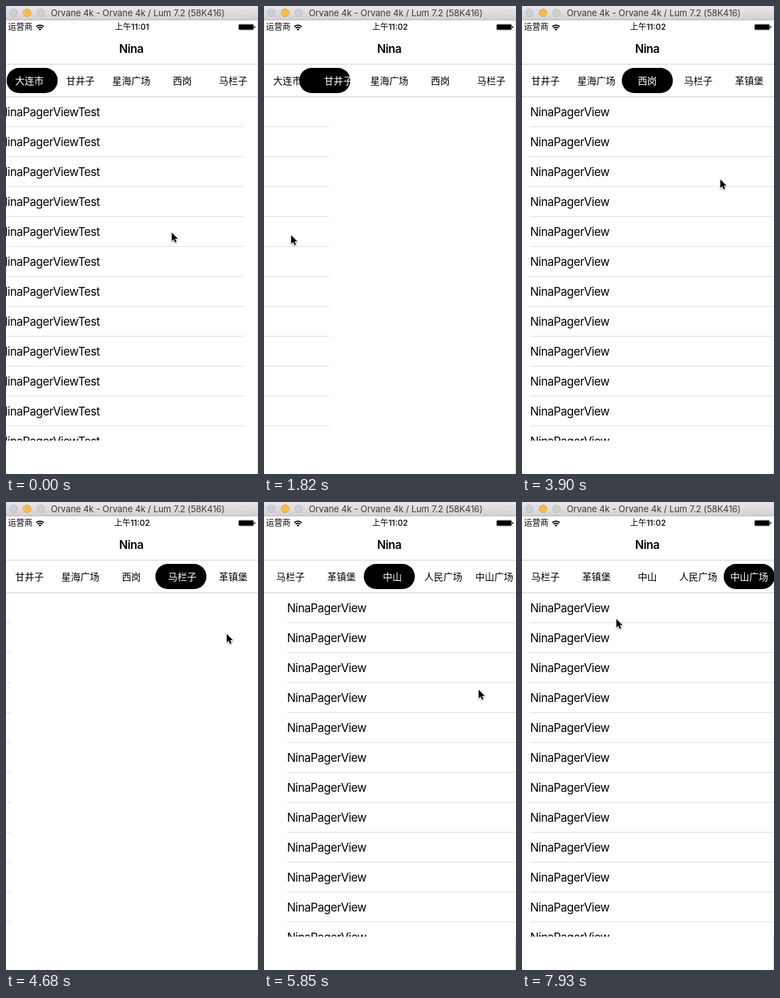
Write an HTML page that moves like this. It is 371 by 688 pixels and loops after 8 s.

```html
<!DOCTYPE html>
<html lang="zh">
<head>
<meta charset="utf-8">
<title>Pager</title>
<style>
html, body { margin: 0; width: 100%; height: 100%; overflow: hidden; background: #fff; }
body { font: 17px Inter, "Noto Sans CJK SC", "Noto Sans CJK", sans-serif; color: #000; }
#stage { position: absolute; left: 0; top: 0; width: 371px; height: 688px; overflow: hidden; background: #fff; }
#stage div, svg { position: absolute; white-space: nowrap; }
#bar { left: 0; top: 0; width: 371px; height: 20px; background: linear-gradient(#e9e7e9, #d3d1d3); border-bottom: 1px solid #b9b7b9; }
#bar i { position: absolute; top: 4px; width: 10px; height: 10px; border: 1px solid #bdbbbd; border-radius: 50%; background: #d0ced0; }
#bar i.on { background: #fdbd41; border-color: #e0a033; }
#bar div { left: 66px; line-height: 20px; font-size: 13px; letter-spacing: -.1px; color: #3c3c3c; }
#carrier { left: 3px; top: 21px; font-size: 12px; line-height: 20px; }
#clock { left: 0; width: 371px; top: 21px; text-align: center; font-size: 12px; line-height: 20px; font-weight: 500; }
#nav { left: 0; width: 369px; top: 50px; text-align: center; line-height: 26px; font-weight: 600; letter-spacing: -.4px; }
#tabBox { left: 0; top: 85px; width: 371px; height: 47px; border: solid #d2d2d4; border-width: 1px 0; overflow: hidden; }
#tabs { top: 0; left: 0; }
#pill { top: 5.4px; width: 75px; height: 36.2px; border-radius: 18.1px; background: #000; }
.tab { top: 0; width: 75px; text-align: center; font-size: 14px; line-height: 47px; }
#edge { left: 370px; width: 1px; background: #dcdcdc; bottom: 0; }
#view { left: 0; top: 134px; width: 371px; height: 505px; overflow: hidden; }
#pages { top: 0; left: 0; }
.page { top: 0; width: 375px; height: 505px; }
.row { left: 15px; width: 360px; height: 43px; line-height: 44px; border-bottom: 1px solid #dfdfe1; letter-spacing: -.48px; }
#cursor { left: 0; top: 0; overflow: visible; filter: drop-shadow(0 1px 1px #0006); }
</style>
</head>
<body>
<div id="stage">
  <div id="bar"><i style="left:5px"></i><i class="on" style="left:25px"></i><i style="left:45px"></i>
    <div>Orvane 4k - Orvane 4k / Lum 7.2 (58K416)</div></div>
  <div id="carrier">运营商</div>
  <svg style="left:43px;top:26px" width="14" height="11" fill="none" stroke="#000" stroke-width="1.9">
    <path d="M1.4 4.4A8 8 0 0 1 12.6 4.4M3.5 6.6A5 5 0 0 1 10.5 6.6"/>
    <path d="M7 10.2L5 8.1A2.9 2.9 0 0 1 9 8.1Z" fill="#000" stroke="none"/>
  </svg>
  <div id="clock"></div>
  <svg style="left:342px;top:26px" width="26" height="10">
    <rect x=".5" y="1" width="22" height="8" rx="1.5" fill="#000" stroke="#777"/>
    <rect x="23.5" y="3.5" width="1.5" height="3" rx=".7"/>
  </svg>
  <div id="nav">Nina</div>
  <div id="edge"></div>
  <div id="tabBox"><div id="tabs"><div id="pill"></div></div></div>
  <div id="view"><div id="pages"></div></div>
  <svg id="cursor" width="12" height="18">
    <path d="M0 0V12.6L2.9 9.9L4.9 14.6L7 13.7L5 9.1H9Z" stroke="#fff" stroke-width="1.4" paint-order="stroke"/>
  </svg>
</div>
<script>
const LOOP = 8000, STEP = 130, TAB = 75, PAGE = 375, INSET = -3;
const names = ['大连市', '甘井子', '星海广场', '西岗', '马栏子', '革镇堡', '中山', '人民广场', '中山广场'];
const lists = [0, 3, 6, 7, 8];

// One swipe per page: start and duration
const swipes = [[-715, 2955], [2340, 650], [3200, 560], [4384, 300], [4720, 300], [5046, 829], [6150, 500], [6850, 600]];
// Pointer stops: time, x, y
const stops = [[0, 244, 333], [1820, 40, 337], [3120, 259, 316], [4680, 325, 194], [5850, 316, 276], [7020, 127, 346], [7930, 139, 172]];

const $ = id => document.getElementById(id);
const clamp = x => Math.min(1, Math.max(0, x));
const smooth = x => x * x * (3 - 2 * x);

// Swipes gather speed until the page snaps into place
const pageAt = t => swipes.reduce((sum, [start, span]) => sum + clamp((t - start) / span) ** 2, 0);

// Just after the halfway point of a swipe, the strip glides to centre the new tab
const shiftAt = t => swipes.slice(2, 6).reduce((sum, [start, span]) =>
  sum + TAB * smooth(clamp((t - start - span * Math.SQRT1_2 - 90) / 150)), 0);

function pointerAt(t) {
  const i = Math.max(1, stops.findIndex(stop => stop[0] >= t));
  const [a, b] = [stops[i - 1], stops[i]];
  const k = (t - a[0]) / (b[0] - a[0]);
  return [1, 2].map(n => a[n] + (b[n] - a[n]) * k);
}

function add(parent, cls, left, text = '') {
  const el = document.createElement('div');
  el.className = cls;
  el.style.left = left + 'px';
  el.textContent = text;
  return parent.appendChild(el);
}

const tabs = names.map((name, i) => add($('tabs'), 'tab', i * TAB, name));
const pages = lists.map(i => {
  const el = add($('pages'), 'page', i * PAGE);
  for (let r = 0; r < 12; r++) {
    add(el, 'row', 15, i ? 'NinaPagerView' : 'NinaPagerViewTest').style.top = r * 44 + 'px';
  }
  return { el, i };
});

function draw(now) {
  const t = Math.floor(now % LOOP / STEP) * STEP;
  const s = pageAt(t), current = Math.round(s);
  const [x, y] = pointerAt(t);
  $('pages').style.left = Math.round(INSET - s * PAGE) + 'px';
  $('tabs').style.left = INSET - shiftAt(t) + 'px';
  $('pill').style.left = s * TAB + 'px';
  tabs.forEach((el, i) => el.style.color = i === current ? '#fff' : '#000');
  pages.forEach(({ el, i }) => el.style.display = i <= current ? '' : 'none');
  $('clock').textContent = t < 1040 ? '上午11:01' : '上午11:02';
  $('edge').style.top = t < 1950 ? '21px' : '640px';
  $('cursor').style.transform = `translate(${x}px, ${y}px)`;
  requestAnimationFrame(draw);
}
draw(0);
</script>
</body>
</html>
```
